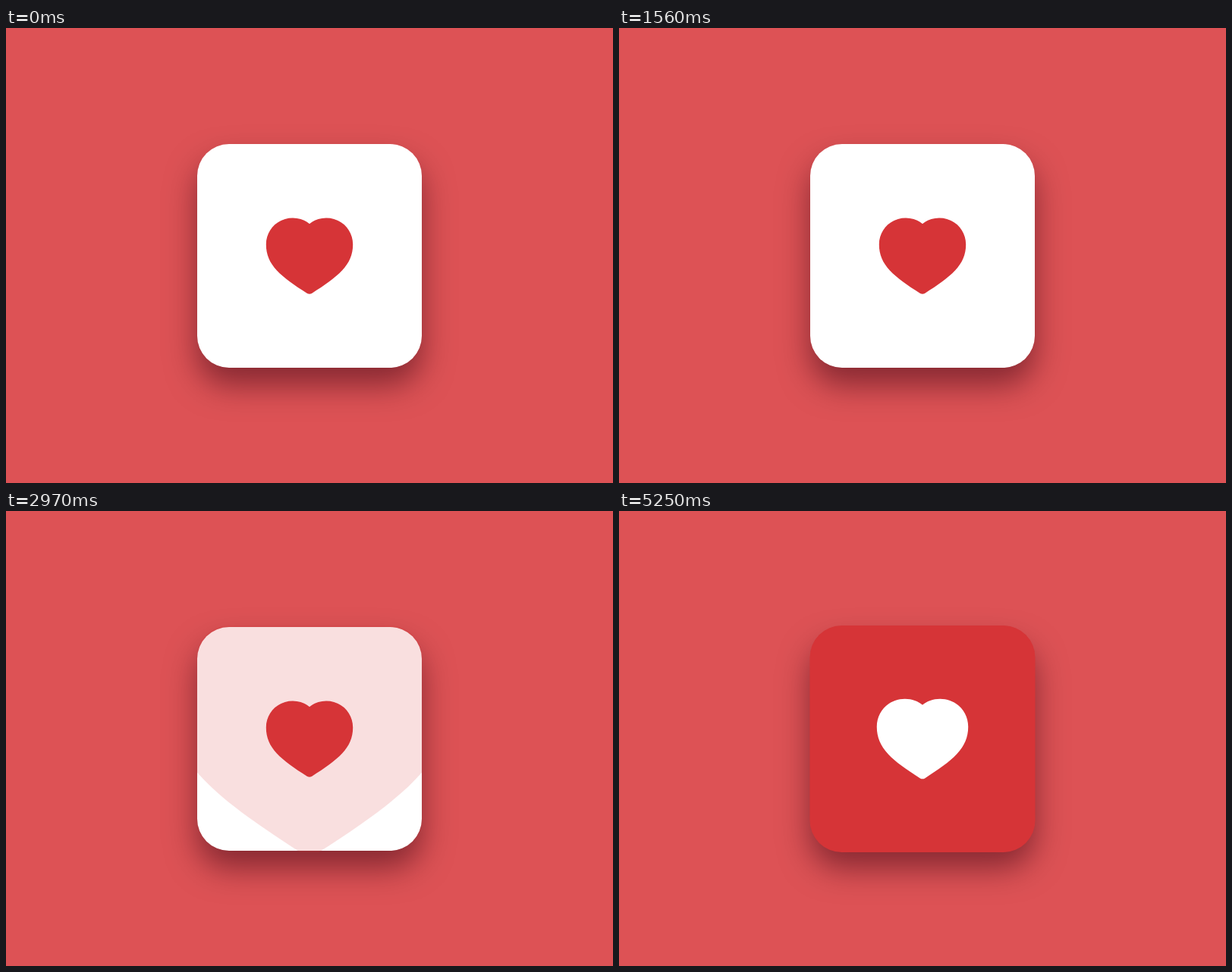
Recreate the animation shown at these times as an HTML page. Size 800x600 px, loop 6.24 s.

```html
<!DOCTYPE html>
<html lang="en">
<head>
<meta charset="utf-8">
<title>Heart button</title>
<style>
  html, body { margin: 0; width: 100%; height: 100%; overflow: hidden; background: #dd5255; }
  .card {
    position: absolute; left: 252.3px; top: 153px; width: 295.3px; height: 295px;
    border-radius: 42px; background: #fff;
    box-shadow: 0 23px 40px rgba(50, 0, 15, .5);
  }
  svg { position: absolute; left: 0; top: 0; display: block; }
</style>
</head>
<body>
<div class="card"></div>
<svg width="800" height="600" viewBox="0 0 800 600">
  <defs>
    <path id="heart" d="M0-42.3C-5.5-47-13-50-22-50C-42-50-57.2-34.5-57.2-15C-57.2 12-38 27-3 49.5C-1 50.6 1 50.6 3 49.5C38 27 57.2 12 57.2-15C57.2-34.5 42-50 22-50C13-50 5.5-47 0-42.3Z"/>
    <clipPath id="tile"><rect x="251.5" y="151" width="297" height="299" rx="42"/></clipPath>
  </defs>
  <g clip-path="url(#tile)" fill="#d63437">
    <use id="wave" href="#heart"/>
    <use id="fill" href="#heart"/>
  </g>
  <use id="icon" href="#heart"/>
</svg>
<script>
  const LOOP = 6240, STEP = 30, LIKE = 4020;
  const MID = 300.5;
  const PULSES = [
    { start: 480, length: 1080, gain: 0.404, drift: 6.2 },
    { start: 2370, length: 1050, gain: 0.4386, drift: -5.7 }
  ];
  const [wave, fill, icon] = ['wave', 'fill', 'icon'].map(id => document.getElementById(id));

  const clamp = x => Math.min(1, Math.max(0, x));
  const smooth = p => p * p * (3 - 2 * p);
  const cubic = p => p < 0.5 ? 4 * p ** 3 : 1 - 4 * (1 - p) ** 3;

  function place(el, scale, y = MID, opacity = 1) {
    el.setAttribute('transform', `translate(400 ${y}) scale(${scale})`);
    el.setAttribute('opacity', opacity);
  }

  function drawWave(t) {
    const pulse = PULSES.find(p => t >= p.start && t < p.start + p.length);
    if (!pulse) return place(wave, 0, MID, 0);
    const age = t - pulse.start;
    const growth = pulse.gain * ((age + 60) / 330) ** 2.4;
    place(wave, 1 + growth, MID + pulse.drift * growth, 0.5 * (1 - cubic(age / pulse.length)));
  }

  function draw(t) {
    drawWave(t);
    if (t < LIKE) {
      place(fill, 0, MID, 0);
      place(icon, 1);
      icon.setAttribute('fill', '#d63437');
      return;
    }
    const spread = smooth(clamp((t - LIKE) / 600));
    place(fill, 0.702 + 4.52 * spread, 299.3 + 68.5 * spread);
    const pop = 1 - (1 - clamp((t - LIKE) / 1230)) ** 2.47;
    place(icon, 1.053 * pop, 300.3);
    icon.setAttribute('fill', '#fff');
  }

  const origin = performance.now();
  function tick(now) {
    const t = Math.max(0, now - origin) % LOOP;
    draw(Math.floor(t / STEP) * STEP);
    requestAnimationFrame(tick);
  }
  draw(0);
  requestAnimationFrame(tick);
</script>
</body>
</html>
```
